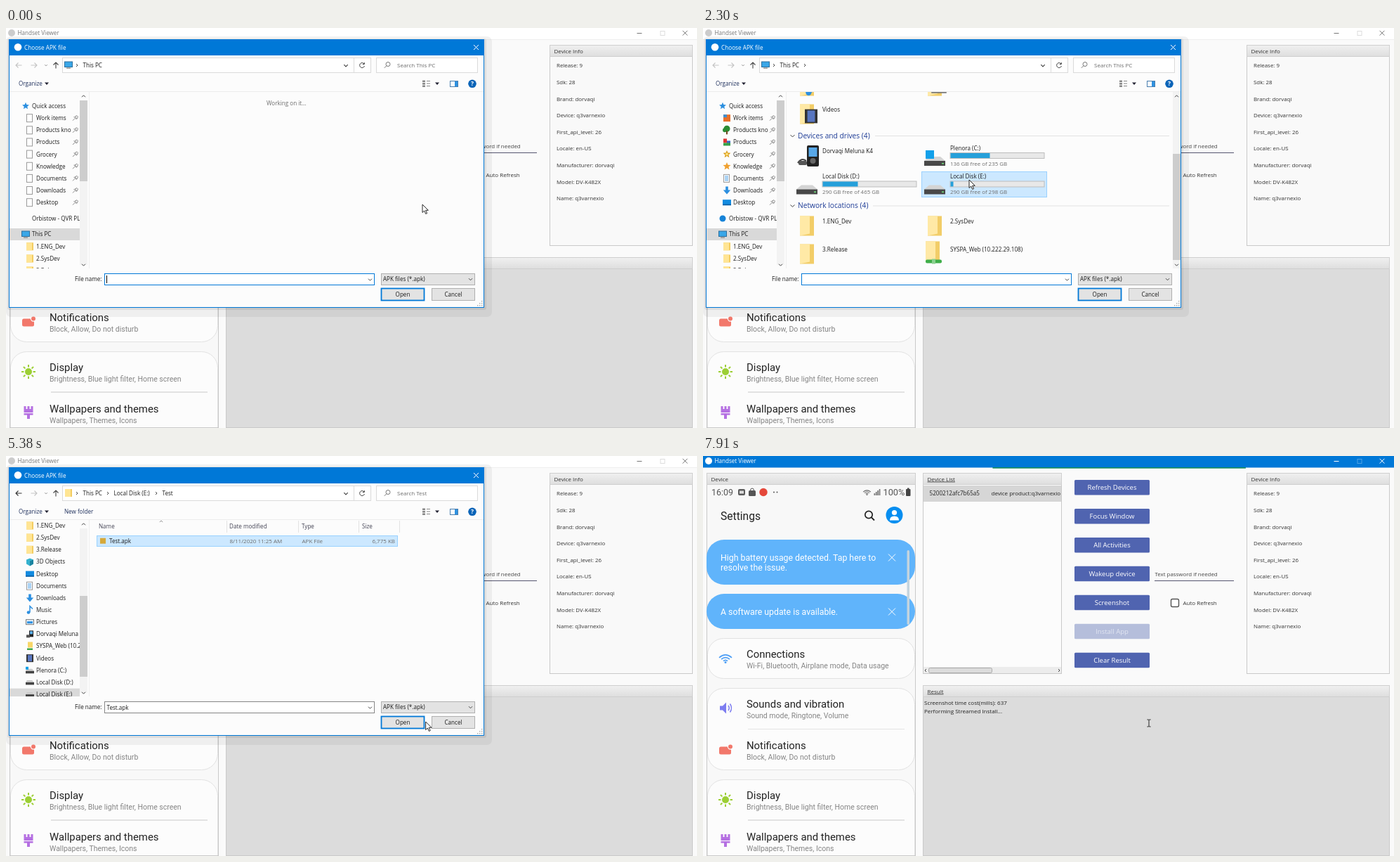
Write an HTML page that moves like this. It is 984x569 px and loops after 8000 ms.

```html
<!DOCTYPE html>
<html lang="en">
<head>
<meta charset="utf-8">
<title>Handset Viewer</title>
<style>
html, body { margin: 0; width: 100%; height: 100%; overflow: hidden; background: #fafafa; }
svg { display: block; width: 100%; height: 100%; }
text { font-family: "Open Sans", "Noto Sans", sans-serif; white-space: pre; }
.ph text { font-family: Roboto, sans-serif; }
</style>
</head>
<body>
<svg id="stage" viewBox="0 0 984 569" xmlns="http://www.w3.org/2000/svg"></svg>
<script>
// Drawing helpers; text is placed by its vertical centre.
const R = (x, y, w, h, f, o = '') => `<rect x="${x}" y="${y}" width="${w}" height="${h}" fill="${f}" ${o}/>`;
const B = (x, y, w, h, f, s, o = '') => R(x + .5, y + .5, w - 1, h - 1, f, `stroke="${s}" ${o}`);
const C = (x, y, r, f, o = '') => `<circle cx="${x}" cy="${y}" r="${r}" fill="${f}" ${o}/>`;
const L = (d, s, w = 1, o = '') => `<path d="${d}" fill="none" stroke="${s}" stroke-width="${w}" ${o}/>`;
const F = (d, f, o = '') => `<path d="${d}" fill="${f}" ${o}/>`;
const T = (x, y, s, z = 8.1, f = '#1c1c1c', o = '') =>
  `<text x="${x}" y="${(y + z * .36).toFixed(2)}" font-size="${z}" fill="${f}" ${o}>${s}</text>`;
const G = (x, y, s) => `<g transform="translate(${x} ${y})">${s}</g>`;
const group = (id, s, o = '') => `<g id="${id}" ${o}>${s}</g>`;
const MID = 'text-anchor="middle"', END = 'text-anchor="end"', UL = 'text-decoration="underline"';
const V = (x, y, a, r = 2.5, s = '#444', w = 1) =>
  L(`M${-r} ${-r / 2}L0 ${r / 2}L${r} ${-r / 2}`, s, w, `transform="translate(${x} ${y}) rotate(${a})"`);
const X = (x, y, r, s, w = 1) => L(`M${x - r} ${y - r}l${2 * r} ${2 * r}m0 ${-2 * r}l${-2 * r} ${2 * r}`, s, w);
const star = (r, f) => F('M' + [...Array(10).keys()].map(i => {
  const a = i * Math.PI / 5, q = i % 2 ? r * .45 : r;
  return `${(q * Math.sin(a)).toFixed(2)} ${(-q * Math.cos(a)).toFixed(2)}`;
}).join('L') + 'Z', f);

const BLUE = '#0078d7', GREY = '#6d6d6d', SKY = '#2b8fe0';

// Small icons, centred on the origin.
const page = B(-5, -6, 9, 12, '#fff', '#999');
const folder = R(-5, -5.5, 10, 11, '#f3cd62') + R(-5, -5.5, 8, 11, '#ffe594');
const drive = F('M-6 0l2-3h7l3 3z', '#ccc') + R(-6, 0, 12, 3.5, '#444');
const icons = {
  page, folder, drive,
  star: star(5.2, SKY),
  orange: R(-5, -5, 10, 10, '#e8702a') + R(-5, -5, 5, 4, '#3f8fd0'),
  tree: C(0, -2, 4.5, '#2a8c33') + C(-3, 0, 3, '#2a8c33') + R(-1, 1, 2, 5, '#70451d'),
  blocks: R(-5, -5, 5, 6, '#d33') + R(0, -2, 5, 4, '#3a66c8') + R(-5, 1, 10, 4, '#35a04a'),
  gold: star(5.6, '#d89a18') + C(0, 0, 2, '#ffe074'),
  amber: star(5.8, '#f0a02e'),
  doc: page + L('M-3-3h5m-5 2h5m-5 2h5m-5 2h5', SKY, .8),
  down: F('M-1.8-5.5h3.6v5h3.4l-5.2 6-5.2-6h3.4z', SKY),
  desk: R(-6, -4, 12, 8, '#128be0') + R(-6, 2.5, 12, 1.5, '#0b5ba0'),
  cloud: C(0, 0, 4.5, '#1683d8'),
  pc: B(-6, -5, 12, 8.5, '#3aa7e8', '#2d6f9d') + R(-3, 4, 6, 1.3, '#888'),
  cube: F('M-5-3l5-2 5 2v6l-5 3-5-3z', '#35b2cf') + F('M0-1l5-2v6l-5 3z', '#1a839f'),
  note: C(-2, 3.5, 2.3, SKY) + L('M0 3.5v-9l4 4', SKY, 1.5),
  pic: B(-6, -4, 12, 8, '#e8f4ff', '#777') + R(-4, -1, 8, 3, SKY),
  player: R(-1, -5, 6, 9, '#222') + R(0, -4, 4, 4, '#5ab0f0') + R(-5, 1, 5, 4, '#555'),
  net: R(-3, -6, 7, 8, '#f7d668') + R(-4, 3, 8, 2.5, '#42a84c'),
  film: R(-5, -5.5, 10, 11, '#333') + R(-3, -4.5, 6, 9, '#5876c0'),
  sys: G(0, 1, drive) + R(-6, -5, 4, 4, '#16a0e6'),
  apk: R(-4, -4, 8, 8, '#d6a93a'),
};
const icon = (n, x, y) => G(x, y, icons[n] || '');

// ---- Main window ----
const panel = (x, y, w, h, name, fill, o) =>
  B(x, y, w, h, fill, '#c9c9c9') + B(x, y, w, 17, 'url(#head)', '#cfcfcf') + T(x + 6.5, y + 8.7, name, 8, '#333', o);

const wifi = (s, c) => [3, 6, 9].map(r => L(`M${-r * s} ${-r * s * .8}Q0 ${-r * s * 1.65} ${r * s} ${-r * s * .8}`, c, 1.7 * s)).join('') + C(0, -.5 * s, 1.5 * s, c);
const entry = (y, a, b) => T(62, y, a, 14.9, '#222') + T(62, y + 17, b, 10.5, '#858585');
const card = (y, h) => B(6, y, 296, h, '#fcfcfc', '#e2e2e2', 'rx="23"');
const sun = [...Array(8).keys()].map(i => R(-1, -10, 2, 3.5, '#9ccf35', `transform="rotate(${i * 45})"`)).join('') + C(0, 0, 5, '#9ccf35');

const phone = `<g class="ph" clip-path="url(#phoneClip)">` +
  T(12, 51.5, '16:09', 12.4, '#555') + R(50, 47, 10, 9, '#5c5c5c', 'rx="2"') + R(52, 49.5, 6, 4, '#ddd') +
  R(65, 49, 10, 8, '#555', 'rx="1.5"') + L('M67.5 49q0-3 2.5-3t2.5 3', '#555') + C(86, 51.5, 5.7, '#e5483b') +
  C(101, 51.5, 1, '#555') + C(105.5, 51.5, 1, '#555') + G(233.5, 55.5, wifi(.6, '#666')) +
  [0, 1, 2, 3].map(i => R(243.5 + i * 2.4, 53 - i * 2, 1.7, 3 + i * 2, '#777')).join('') +
  T(256.5, 51.5, '100%', 12.7, '#555') + R(289, 47, 6.5, 10, '#444', 'rx="1"') + R(291, 45.5, 2.5, 2, '#444') +
  T(25, 85, 'Settings', 15.6, '#222') + C(236, 83.5, 5.2, 'none', 'stroke="#222" stroke-width="1.7"') + L('M240 87.5l4 4', '#222', 1.8) +
  C(272.5, 84, 12, '#078ef0') + C(272.5, 80.5, 3.6, '#fff') + F('M266 91.5q0-6 6.5-6t6.5 6z', '#fff') +
  R(5, 119, 297, 64, '#60b4fb', 'rx="25"') + R(5, 196, 297, 50, '#60b4fb', 'rx="25"') +
  T(25, 144.5, 'High battery usage detected. Tap here to', 12.3, '#fff') + T(25, 159, 'resolve the issue.', 12.3, '#fff') +
  T(25, 221.5, 'A software update is available.', 12.3, '#fff') + X(269, 144.5, 5, '#fff') + X(269, 221.5, 5, '#fff') +
  R(290.5, 134, 3.5, 106, '#c4d4de', 'rx="1.7"') +
  card(259, 58) + card(330, 117) + card(460, 150) +
  entry(281.5, 'Connections', 'Wi-Fi, Bluetooth, Airplane mode, Data usage') +
  entry(352.5, 'Sounds and vibration', 'Sound mode, Ringtone, Volume') +
  entry(411.5, 'Notifications', 'Block, Allow, Do not disturb') +
  entry(482.5, 'Display', 'Brightness, Blue light filter, Home screen') +
  entry(541.5, 'Wallpapers and themes', 'Wallpapers, Themes, Icons') +
  R(64, 388, 223, 1, '#e4e4e4') + R(64, 517.5, 223, 1, '#cacaca') +
  G(32, 294, wifi(1, '#4f9ff5')) +
  G(32, 358.5, F('M-8-3h4l5-5v16l-5-5h-4z', '#7d7df0') + L('M4-3.5q2.5 3.5 0 7m2.5-9.5q4 6 0 12', '#7d7df0', 1.5)) +
  G(32, 418.5, R(-9, -5, 17, 11, '#f2786b', 'rx="2.5"') + C(7, -5, 4.2, '#fcfcfc') + C(7, -5, 3, '#f2786b')) +
  G(32, 489, sun) +
  G(32, 547, F('M-6.5-9h3v4h2v-4h3v4h2v-4h3v9h-13z', '#b570e2') + R(-6.5, 1, 13, 2.5, '#b570e2') + R(-2, 3, 4, 6, '#b570e2')) + '</g>';

const buttons = ['Refresh Devices', 'Focus Window', 'All Activities', 'Wakeup device', 'Screenshot', 'Install App', 'Clear Result']
  .map((s, i) => {
    const y = 34 + i * 40.95, off = i === 5;
    return R(529, y, 107, 21.5, off ? '#b5bedb' : '#5064b0', 'rx="1.5"') + T(582.5, y + 10.7, s, 9.5, off ? '#e2e6f2' : '#fff', MID);
  }).join('');

const info = ['Release: 9', 'Sdk: 28', 'Brand: dorvaqi', 'Device: q3varnexio', 'First_api_level: 26', 'Locale: en-US',
  'Manufacturer: dorvaqi', 'Model: DV-K482X', 'Name: q3varnexio'].map((s, i) => T(784, 53.5 + i * 23.6, s, 7.9, '#333')).join('');

const titleBar = (bg, fg, box) => R(0, 0, 984, 16.5, bg) + C(8, 7, 5, bg === BLUE ? '#fff' : '#ccc') + T(16.5, 7.3, 'Handset Viewer', 8.1, fg) +
  R(898.5, 7, 7, 1, fg) + B(931.5, 4, 7, 7, 'none', box) + X(967, 7.2, 3.4, fg);

const main = R(0, 0, 984, 569, '#fafafa') +
  group('idle', titleBar('#fff', '#777', '#ddd') + R(0, 16, 984, 1, '#eee')) + group('active', titleBar(BLUE, '#fff', '#4ea1e4')) +
  panel(5, 24, 298, 545, 'Device', '#f8f8f8') + phone +
  panel(313, 24, 198, 286, 'Device List', '#fcfcfc', UL) + R(314, 42, 196, 23, '#d6d6d6') +
  T(322.5, 53.5, '5200212afc7b65a5', 8.1, '#222') + T(410.5, 53.5, 'device product:q3varnexio', 8, '#222', 'clip-path="url(#listClip)"') +
  R(314, 300, 196, 9, '#ececec') + B(321, 301, 91, 8, '#dcdcdc', '#aaa', 'rx="2"') + V(317, 305, 90, 2) + V(507, 305, -90, 2) +
  buttons + T(643.5, 168, 'Text password if needed', 7.9, '#444') + R(643, 177, 113, 1, '#55556f') +
  B(666, 203, 12, 12, '#fff', '#555', 'rx="2" stroke-width="1.4"') + T(683.5, 209.3, 'Auto Refresh', 8, '#333') +
  panel(774, 24, 204, 286, 'Device Info', '#f9f9f9') + info +
  panel(313, 326, 665, 243, 'Result', '#dcdcdc', UL) +
  T(315, 351, 'Screenshot time cost(mills): 637', 8, '#222') + T(315, 363.3, 'Performing Streamed Install...', 8, '#222') +
  '<rect id="bar" y="16" height="1.7" fill="#138a63"/>';

// ---- File dialog ----
const arrow = (x, a, c) => L('M4.5 0h-8.5m3.5-3.5l-3.5 3.5 3.5 3.5', c, 1.1, `transform="translate(${x} 53) rotate(${a})"`);
const tri = (x, y) => F(`M${x - 3} ${y - 1.5}h6l-3 3.5z`, '#223');

const side = (rows, thumb) => `<g clip-path="url(#sideClip)">` + rows.map(([y, n, s, lvl, pin]) =>
  (s === 'This PC' || s === 'Local Disk (E:)' ? R(5, y - 8.5, 100, 17, '#d9d9d9') : '') +
  icon(n, lvl ? 34 : 28, y) + T(lvl ? 43 : 37, y, s) +
  (pin ? R(93, y - 7, 12, 14, '#fcfcfc') + G(98.5, y, L('M-3.5 3.5l3-3m-1.5-2.5l4 4m-2.5-4l3-1.5 1.5 1.5-1.5 3z', '#888', 1)) : '')).join('') + '</g>' +
  R(105, 103, 11, 234, '#f3f3f3') + R(105, thumb, 11, 115, '#cdcdcd');

const quick = blank => side([
  ['star', 'Quick access'], ['orange', 'Work items'], ['tree', 'Products kno'], ['blocks', 'Products'], ['gold', 'Grocery'],
  ['amber', 'Knowledge'], ['doc', 'Documents'], ['down', 'Downloads'], ['desk', 'Desktop'],
].map(([n, s], i) => [111 + i * 17.15, blank && i ? 'page' : n, s, i, i]).concat([
  [271, blank ? '' : 'cloud', 'Orbistow - QVR PL'], [293.5, 'pc', 'This PC'],
  [310.8, 'folder', '1.ENG_Dev', 1], [328, 'folder', '2.SysDev', 1], [345, 'folder', '3.Release', 1]]), 103);

const places = side([['folder', '1.ENG_Dev'], ['folder', '2.SysDev'], ['folder', '3.Release'], ['cube', '3D Objects'], ['desk', 'Desktop'],
  ['doc', 'Documents'], ['down', 'Downloads'], ['note', 'Music'], ['pic', 'Pictures'], ['player', 'Dorvaqi Meluna K4'],
  ['net', 'SYSPA_Web (10.222.29.108)'], ['film', 'Videos'], ['sys', 'Plenora (C:)'], ['drive', 'Local Disk (D:)'], ['drive', 'Local Disk (E:)'],
].map(([n, s], i) => [99 + i * 17.15, n, s, 1]), 199);

const path = (n, crumbs, find) => icon(n, 89, 52.5) + V(101, 53, -90, 2) +
  crumbs.map(([x, s]) => T(x, 53, s) + (x > 110 ? V(x - 8.5, 53, -90, 2) : '')).join('') + T(557, 53, 'Search ' + find, 8, GREY);

// Tiles are laid out in the scrolled-down position.
const SCROLL = 126, NOTCH = 90, COLS = [148, 330], ROWS = [2.5, 42.5, 82.5, 122.5, 182, 222.5, 281.5, 321.5];
const bigFolder = R(-10, -14, 20, 28, '#f2cd68') + F('M-10-14h14v25l-14 3z', '#ffe9a6');
const bigDrive = F('M-15 7l7-6h16l7 6z', '#d4d4d4') + R(-15, 7, 30, 7, '#484848') + R(10, 10, 3, 1.5, '#6fe07a');
const tile = (c, r, s, art) => G(COLS[c], ROWS[r], art) + T(COLS[c] + 22, ROWS[r] - 6.5, s);
const badge = n => bigFolder + `<g transform="translate(6 3) scale(1.8)">${icons[n]}</g>`;
const disk = (c, r, s, used, free, extra = '') => {
  const x = COLS[c] + 22, y = ROWS[r];
  return G(COLS[c], y, bigDrive + extra) + T(x, y - 11.3, s) + B(x - .5, y - 5, 135, 9, '#e8e8e8', '#bdbdbd') +
    R(x + .5, y - 4, used, 7, '#26a0da') + T(x, y + 10.8, free, 7.9, GREY);
};
const heading = (y, s, x) => V(127.5, y + .5, 0, 3, '#444') + T(135, y, s, 10.2, '#1e3c96') + R(x, y, 664 - x, 1, '#e3e3e3');
const playerArt = L('M-13 10q5-8 12-3', '#444', 2) + R(-12, 7, 12, 6, '#555', 'rx="2"') + R(0, -15, 17, 30, '#222', 'rx="2"') + R(2.5, -12, 12, 13, '#58a8e8') + C(8.5, 7, 4, '#666');
const thisPc = heading(-26.5, 'Folders (7)', 194) +
  [['cube', '3D Objects'], ['desk', 'Desktop'], ['doc', 'Documents'], ['down', 'Downloads'], ['note', 'Music'], ['pic', 'Pictures'], ['film', 'Videos']]
    .map(([n, s], i) => tile(i % 2, i >> 1, s, badge(n))).join('') +
  heading(153, 'Devices and drives (4)', 245) + tile(0, 4, 'Dorvaqi Meluna K4', playerArt) +
  disk(1, 4, 'Plenora (C:)', 56, '136 GB free of 235 GB', R(-13, -8, 12, 12, '#12a0ea')) +
  disk(0, 5, 'Local Disk (D:)', 50, '290 GB free of 465 GB') + disk(1, 5, 'Local Disk (E:)', 4, '290 GB free of 298 GB') +
  heading(252.5, 'Network locations (4)', 242) + tile(0, 6, '1.ENG_Dev', bigFolder) + tile(1, 6, '2.SysDev', bigFolder) +
  tile(0, 7, '3.Release', bigFolder) +
  tile(1, 7, 'SYSPA_Web (10.222.29.108)', G(-3, -4, bigFolder) + R(-13, 8, 23, 5, '#3fae49', 'rx="2"') + R(-4, 7, 5, 7, '#8ad08f'));

const columns = [['Name', 132, 314], ['Date modified', 318, 416], ['Type', 421, 502], ['Size', 507, 560]]
  .map(([s, x, e]) => T(x, 100, s, 8.1, '#445') + R(e, 92, 1, 17, '#e2e2e2')).join('') + V(221, 93, 180, 2.2, '#777', .8);
const file = (i, n, s, date, kind, size = '') => {
  const y = 120.7 + i * 15;
  return icon(n, 138, y) + T(147, y, s) + T(318.5, y, date, 8, GREY) + T(421.5, y, kind, 8, GREY) + T(554, y, size, 8, GREY, END);
};
const diskFiles = [['Amttw5n5BdX', '8/25/2020 4:57 PM'], ['Android', '7/14/2020 9:31 AM'], ['OBSRecordVideos', '7/9/2020 6:23 PM'],
  ['PostgreSQL', '7/9/2020 6:06 PM'], ['Test', '9/7/2020 4:09 PM'], ['Tttw5n5BdX', '8/25/2020 4:57 PM']]
  .map(([s, d], i) => file(i, 'folder', s, d, 'File folder')).join('');

// Controls that light up under the pointer: x, y, width, height, label.
const controls = {
  types: [534, 349, 134, 17, T(537, 357.3, 'APK files (*.apk)') + V(661.5, 357.5, 0, 2.5)],
  open: [534, 370, 62, 18, T(565, 379, 'Open', 8.1, '#1c1c1c', MID)],
  cancel: [606, 370, 62, 18, T(637, 379, 'Cancel', 8.1, '#1c1c1c', MID)],
};
const controlArt = Object.entries(controls).map(([id, [x, y, w, h, label]]) =>
  B(x, y, w, h, '#e3e3e3', '#b0b0b0', `id="${id}" stroke-width="${id === 'open' ? 1.8 : 1}"`) + label).join('');

const dialog = R(0, 12, 692, 399, '#000', 'opacity=".05" rx="7"') + R(2, 15, 682, 386, '#000', 'opacity=".07" rx="3"') +
  B(4, 16, 677, 382, '#fcfcfc', BLUE) + R(4, 16, 677, 23, BLUE) + C(17, 27.3, 5.3, '#fff') + T(26, 27.8, 'Choose APK file', 8.2, '#fff') + X(669.5, 27.5, 3.5, '#fff') +
  group('backOff', arrow(18, 0, '#c4c4c4')) + group('backOn', arrow(18, 0, '#333')) + arrow(40, 180, '#c4c4c4') + V(57, 53, 0, 1.8, '#999') + arrow(71, 90, '#444') +
  B(80, 42, 440, 22, '#fff', '#dadada') + R(495, 43, 1, 20, '#dadada') + V(484, 53.5, 0, 2.7, '#444', 1.2) +
  L('M510 51a3.5 3.5 0 1 0 .5 3m-.2-5v2.5h-2.5', '#444', 1) +
  B(527, 42, 145, 22, '#fff', '#dadada') + C(544, 51.5, 3, 'none', 'stroke="#777"') + L('M541.8 53.8l-3 3', '#777') +
  T(18, 79.3, 'Organize', 8.1, '#1e2f5c') + tri(58, 79) + group('newDir', T(83, 79.3, 'New folder', 8.1, '#1e2f5c')) +
  [0, 1, 2].map(i => R(593, 74.5 + i * 3.5, 4, 2.5, '#888') + R(599, 75 + i * 3.5, 5, 1, '#888')).join('') + tri(614, 79) +
  B(632, 75, 12, 9, '#fff', '#4a7fb0') + R(639, 76, 4, 7, '#2f92e0') + C(664, 79.3, 5.8, '#0a64b8') + T(664, 79.4, '?', 8.5, '#fff', MID + ' font-weight="700"') +
  R(5, 90, 675, 1, '#ececec') + R(118, 91, 1, 251, '#efefef') +
  group('sideBlank', quick(true)) + group('sideQuick', quick(false)) + group('sidePlaces', places) +
  V(110.5, 97, 180) + V(110.5, 337, 0) +
  group('crumbPc', path('pc', [[109.5, 'This PC']], 'This PC')) + group('crumbTail', V(145, 53, -90, 2)) +
  group('wait', T(371, 107.5, 'Working on it...', 8.1, GREY)) +
  group('viewPc', `<g clip-path="url(#paneClip)"><g id="scroll"><rect id="tileMark" width="178" height="36"/>${thisPc}</g></g>` +
    R(669, 91, 11, 251, '#f3f3f3') + '<rect id="thumb" x="669" width="11" height="151" fill="#cdcdcd"/>' + V(674.5, 97, 180) + V(674.5, 337, 0)) +
  '<rect id="rowMark" width="428" height="15"/>' +
  group('viewDisk', path('drive', [[109.5, 'This PC'], [153.5, 'Local Disk (E:)']], 'Local Disk (E:)') + group('diskTail', V(214, 53, -90, 2)) + columns + diskFiles) +
  group('viewTest', path('folder', [[109.5, 'This PC'], [153.5, 'Local Disk (E:)'], [222.5, 'Test']], 'Test') + columns +
    file(0, 'apk', 'Test.apk', '8/11/2020 11:25 AM', 'APK File', '6,775 KB')) +
  T(136.5, 357.5, 'File name:', 8.1, '#1c1c1c', END) + '<rect id="field" x="140.5" y="349.5" width="384" height="16" fill="#fff"/>' +
  V(518.5, 358, 0, 2.5) + group('caret', R(143, 352, 1, 11, '#000')) + group('picked', T(143.5, 357.8, 'Test.apk')) + controlArt +
  [[0, 0], [-3, 0], [-6, 0], [0, -3], [-3, -3], [0, -6]].map(([x, y]) => R(677 + x, 394 + y, 1.4, 1.4, '#aaa')).join('');

const clip = (id, ...r) => `<clipPath id="${id}">${R(...r, '#000')}</clipPath>`;
document.getElementById('stage').innerHTML =
  '<defs><linearGradient id="head" x2="0" y2="1"><stop stop-color="#f0f0f0"/><stop offset="1" stop-color="#dedede"/></linearGradient>' +
  clip('sideClip', 5, 91, 100, 251) + clip('paneClip', 119, 91, 550, 251) + clip('phoneClip', 5, 41, 297, 527) + clip('listClip', 314, 42, 195, 24) + '</defs>' +
  main + group('dialog', dialog) +
  group('pointer', F('M0 0v11.5l2.7-2.5 2 4.4 1.9-.8-2-4.3h3.7z', '#fff', 'stroke="#111" stroke-width=".9"')) +
  group('beam', L('M-2.5-5h2l.5.5.5-.5h2M0-4.5v9M-2.5 5h2l.5-.5.5.5h2', '#222', 1));

// ---- Motion ----
const LOOP = 8000;
const ticks = [[120, 120, 1], [400, 1370, 8], [1490, 1730, 3], [2010, 2970, 8], [3120, 3270, 2], [3550, 4510, 8],
  [4660, 5650, 8], [5780, 6730, 8], [6850, 7780, 8], [7910, 7910, 1]]
  .flatMap(([a, b, n]) => [...Array(n).keys()].map(i => a + (b - a) * i / Math.max(1, n - 1)));

// Moments at which the user or the system acts.
const AT = { loaded: 120, path: 400, scroll: 670, scrollEnd: 810, pickDisk: 2010, disk: 2420, diskReady: 2830,
  pickDir: 3270, test: 3550, pickFile: 3820, press: 5220, install: 5500 };
const track = [[0, 593, 251], [300, 593, 251], [1370, 353, 265], [1490, 298, 236], [1610, 326, 224], [1730, 379, 216],
  [2690, 379, 216], [2830, 240, 192], [2970, 198, 175], [3550, 198, 175], [3820, 185, 118], [3961, 185, 118],
  [4373, 492, 312], [4510, 600, 393], [4660, 588, 384], [4800, 576, 379], [5230, 576, 379],
  [5509, 620, 377], [5650, 635, 380], [LOOP, 635, 380]];
const $ = Object.fromEntries([...document.querySelectorAll('[id]')].map(e => [e.id, e]));
const show = (id, on) => { $[id].style.display = on ? '' : 'none'; };
const set = (id, attrs) => { for (const k in attrs) $[id].setAttribute(k, attrs[k]); };
const mark = (id, x, y, chosen) => set(id, { x, y, fill: chosen ? '#cce8ff' : '#e5f3ff', stroke: chosen ? '#99d1ff' : 'none' });

function cursorAt(t) {
  const i = track.findIndex(k => k[0] > t), a = track[i - 1], b = track[i], u = (t - a[0]) / (b[0] - a[0]);
  return [a[1] + (b[1] - a[1]) * u, a[2] + (b[2] - a[2]) * u];
}

function drawTiles(t, cx, cy) {
  const notches = (t >= AT.scroll) + (t >= AT.scrollEnd);
  const scrolled = Math.min(SCROLL, NOTCH * notches), drop = SCROLL - scrolled;
  set('scroll', { transform: `translate(0 ${drop})` });
  set('thumb', { y: 103 + scrolled * 76 / SCROLL });
  const row = ROWS.find(y => Math.abs(cy - drop - y) <= 18.7), col = COLS.find(x => cx > x - 19 && cx < x + 160);
  show('tileMark', row && col);
  if (row && col) mark('tileMark', col - 18.5, row - 18, t >= AT.pickDisk);
}

function drawRows(t, cx, cy) {
  const inTest = t >= AT.test, hover = Math.floor((cy - 113) / 15), count = inTest ? 1 : 6;
  const chosen = t >= (inTest ? AT.pickFile : AT.pickDir);
  const row = chosen ? (inTest ? 0 : 4) : hover;
  show('rowMark', t >= AT.disk && row >= 0 && row < count && (chosen || cx > 129 && cx < 558));
  mark('rowMark', 129.5, 113.5 + row * 15, chosen);
}

function drawControls(t, cx, cy) {
  for (const [id, [x, y, w, h]] of Object.entries(controls)) {
    const hot = cx >= x && cx < x + w && cy >= y && cy < y + h;
    set(id, { fill: !hot ? '#e3e3e3' : t >= AT.press ? '#cce4f7' : '#e5f1fb', stroke: hot || id === 'open' ? BLUE : '#b0b0b0' });
  }
}

function draw() {
  const now = performance.now() % LOOP;
  const t = ticks.reduce((p, k) => k <= now ? k : p, 0);
  const [cx, cy] = cursorAt(t);
  const open = t < AT.install, loaded = t >= AT.loaded, pc = t < AT.disk, inTest = t >= AT.test;

  for (const id of ['dialog', 'idle', 'pointer']) show(id, open);
  for (const id of ['active', 'beam', 'bar']) show(id, !open);
  set(open ? 'pointer' : 'beam', { transform: `translate(${cx} ${cy})` });

  show('sideBlank', !loaded); show('sideQuick', pc && loaded); show('sidePlaces', !pc);
  show('wait', !loaded); show('viewPc', pc && loaded); show('viewDisk', !pc && !inTest); show('viewTest', inTest);
  show('crumbPc', pc); show('crumbTail', pc && t >= AT.path); show('diskTail', t >= AT.diskReady);
  show('backOff', pc); show('backOn', !pc); show('newDir', !pc);

  drawTiles(t, cx, cy);
  drawRows(t, cx, cy);
  drawControls(t, cx, cy);
  show('caret', t < 400 || t >= 950 && t < 1490);
  show('picked', t >= AT.pickFile);
  set('field', { stroke: pc ? BLUE : '#858585' });

  // Indeterminate bar: sweeps across while growing, then shrinking.
  const u = ((t - 5463) / 962.6 + 9) % 1, w = 984 * .8 * Math.min(u, 1 - u);
  set('bar', { x: 984 * Math.min(1, u / .9) - w / 2, width: w });
  requestAnimationFrame(draw);
}
draw();
</script>
</body>
</html>
```
